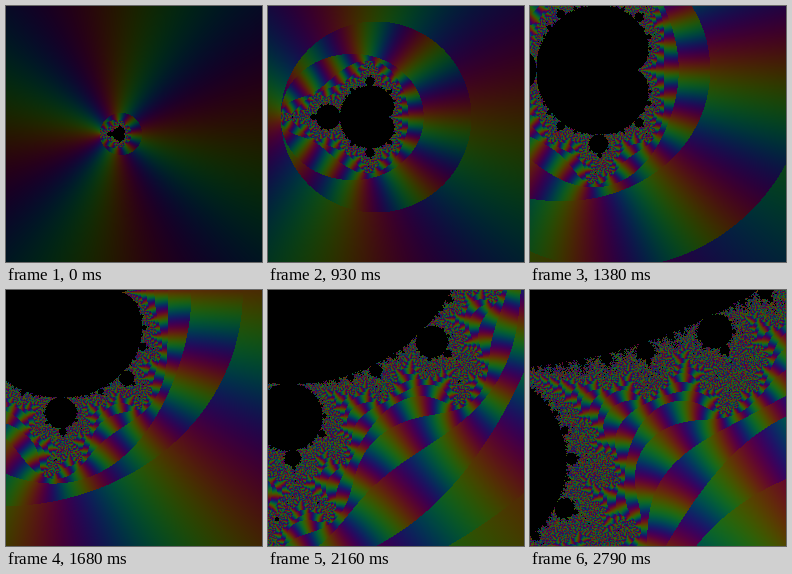
An HTML page with a canvas for the animation above (2820 ms loop, 256 px wide and 256 px high).

```html
<!DOCTYPE html>
<html lang="en">
<head>
<meta charset="utf-8">
<title>Mandelbrot zoom</title>
<style>
  html, body { margin: 0; width: 100%; height: 100%; overflow: hidden; background: #000; }
  canvas { display: block; width: 100vmin; height: 100vmin; image-rendering: pixelated; }
</style>
</head>
<body>
<canvas width="256" height="256"></canvas>
<script>
const SIZE = 256, STEP = 30, STEPS = 94, MAX_ITER = 200;
const HUE_SHIFT = 0.65, THIRD = Math.PI * 2 / 3;
const ctx = document.querySelector('canvas').getContext('2d');
const image = ctx.createImageData(SIZE, SIZE);
const pixels = new Uint32Array(image.data.buffer);

// Pixels per unit grow by 5% each step.
const scaleAt = step => 10.52 * 1.05 ** step;

// Camera path: step, then the screen position of the plane's origin.
const path = [
  [0, 114.5, 127.5], [31, 107.5, 110.5], [46, 80.5, 63.5], [56, 74.6, 2],
  [72, 64.3, -136], [81, 53, -261.5], [93, 65.3, -560]
];
const knots = path.map(p => scaleAt(p[0]));

function slope(i, axis) {
  return (path[i + 1][axis] - path[i][axis]) / (knots[i + 1] - knots[i]);
}

function tangent(i, axis) {
  if (i === 0) return slope(0, axis);
  if (i === path.length - 1) return slope(i - 1, axis);
  const before = knots[i] - knots[i - 1], after = knots[i + 1] - knots[i];
  return (slope(i - 1, axis) * after + slope(i, axis) * before) / (before + after);
}

// Cubic Hermite interpolation over the zoom scale.
function originAt(scale, axis) {
  let i = 0;
  while (i < path.length - 2 && scale > knots[i + 1]) i++;
  const width = knots[i + 1] - knots[i], u = (scale - knots[i]) / width, w = 1 - u;
  return w * w * (1 + 2 * u) * path[i][axis] + u * u * (3 - 2 * u) * path[i + 1][axis]
    + width * u * w * (w * tangent(i, axis) - u * tangent(i + 1, axis));
}

// Hue is the angle of z two rounds after escape; brightness falls with the potential.
function colour(cx, cy) {
  let x = cx, y = cy, n = 1, extra = 0;
  while (extra < 2) {
    if (extra || x * x + y * y > 4) extra++;
    if (++n > MAX_ITER) return 0xff000000;
    const nx = x * x - y * y + cx;
    y = 2 * x * y + cy;
    x = nx;
  }
  const potential = Math.max(0, Math.log(x * x + y * y)) / 2 ** n;
  const value = 105 / (1 + 0.65 * potential);
  const hue = Math.atan2(y, x) + HUE_SHIFT;
  const channel = peak => value * (0.5 + 0.5 * Math.cos(hue - peak));
  return 0xff000000 | channel(2 * THIRD) << 16 | channel(THIRD) << 8 | channel(0);
}

function draw(step) {
  const scale = scaleAt(step), ox = originAt(scale, 1), oy = originAt(scale, 2);
  for (let y = 0, i = 0; y < SIZE; y++)
    for (let x = 0; x < SIZE; x++)
      pixels[i++] = colour((x - ox) / scale, (y - oy) / scale);
  ctx.putImageData(image, 0, 0);
}

const start = performance.now();
let shown = -1;
function tick() {
  const step = Math.floor((performance.now() - start) / STEP) % STEPS;
  if (step !== shown) draw(shown = step);
  requestAnimationFrame(tick);
}
tick();
</script>
</body>
</html>
```
